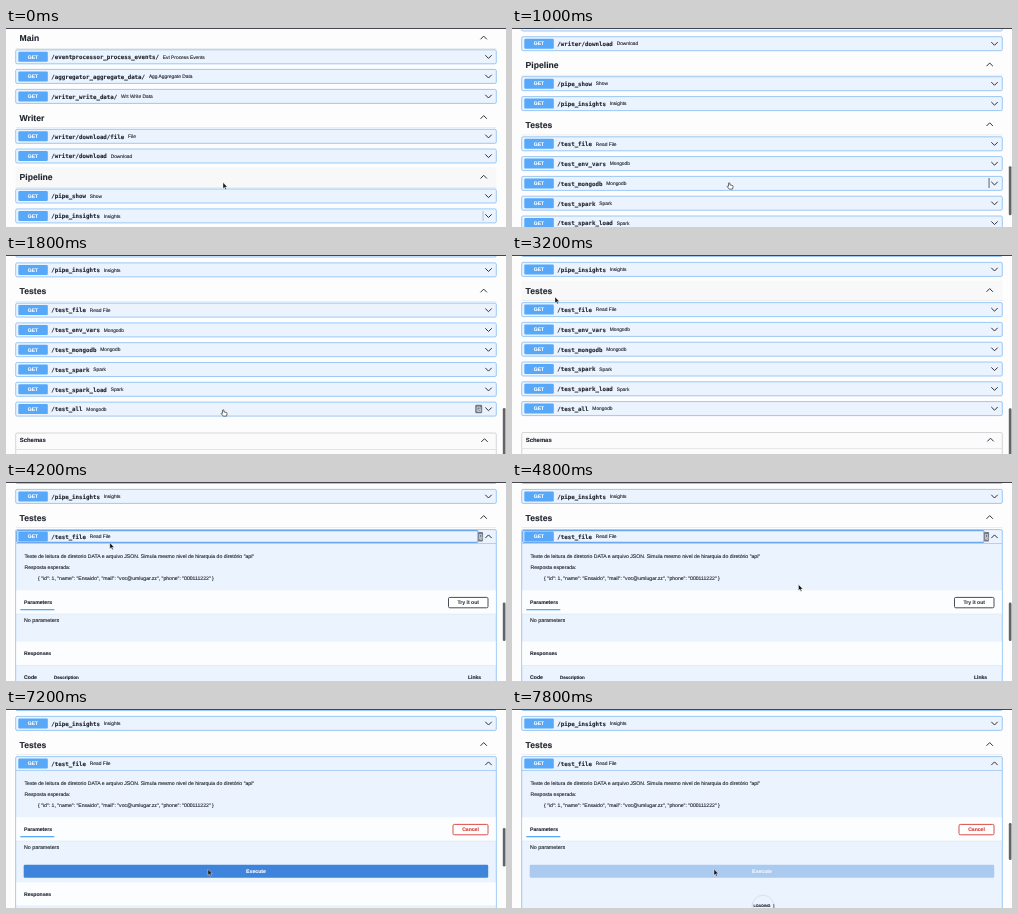
Write an HTML page that moves like this. It is 500 px wide and 199 px high and loops after 8 s.

```html
<!DOCTYPE html>
<html lang="pt">
<head>
<meta charset="utf-8">
<title>API docs</title>
<style>
  html, body { margin: 0; width: 100%; height: 100%; overflow: hidden; background: #fdfdfd; }
  svg { display: block; width: 500px; height: 199px; text-rendering: geometricPrecision; }
  text { font-family: "Liberation Sans", Arial, sans-serif; fill: #20242f; stroke: #20242f; stroke-width: 0.12; white-space: pre; }
  .b { font-weight: 700; }
  .m { font-family: "DejaVu Sans Mono", monospace; font-weight: 700; }
</style>
</head>
<body>
<svg id="stage" viewBox="0 0 500 199"></svg>
<script>
const LOOP = 8000, STEP = 200, MONO = 5.77;
const BLUE = '#58a8fa', EDGE = '#86bdf3', PALE = '#eaf3fe';
const stage = document.getElementById('stage');

function el(tag, attrs, parent, content) {
  const node = document.createElementNS(stage.namespaceURI, tag);
  for (const key in attrs) node.setAttribute(key, attrs[key]);
  if (content) node.textContent = content;
  return parent.appendChild(node);
}
const group = (parent, attrs = {}) => el('g', attrs, parent);
const rect = (p, x, y, width, height, fill, more) =>
  el('rect', { x, y, width, height, fill, ...more }, p);
// y is the vertical middle of the line
const label = (p, x, y, size, str, cls = '', more = {}) =>
  el('text', { x, y: y + size * 0.355, 'font-size': size, class: cls, ...more }, p, str);
const centred = (p, x, y, size, str, ink) =>
  label(p, x, y, size, str, 'b', { 'text-anchor': 'middle', style: `fill:${ink};stroke:${ink}` });
const show = (node, on) => node.setAttribute('display', on ? 'inline' : 'none');
const move = (node, x, y) => node.setAttribute('transform', `translate(${x} ${y})`);

function chevron(p, x, y, up) {
  const d = up ? 1.6 : -1.6;
  el('path', { d: `M${x - 3.2} ${y + d}L${x} ${y - d}L${x + 3.2} ${y + d}`,
    fill: 'none', stroke: '#2c303b', 'stroke-width': 1 }, p);
}

function rowHead(p, y, path, note, up) {
  rect(p, 12.3, y - 5, 29.5, 10, BLUE, { rx: 1.2 });
  centred(p, 27, y, 5.1, 'GET', '#fff');
  label(p, 45.3, y + 0.3, MONO, path, 'm');
  label(p, 49.1 + path.length * MONO * 0.602, y, 4.85, note);
  chevron(p, 482.5, y, up);
}

function row(p, y, path, note) {
  rect(p, 9.7, y - 7, 480.6, 14, PALE, { rx: 1.4, stroke: EDGE, 'stroke-width': 0.8 });
  rowHead(p, y, path, note);
}

function section(p, y, name) {
  label(p, 13.6, y, 8.6, name, 'b');
  chevron(p, 477.7, y - 0.3, true);
  rect(p, 9.5, y + 10, 481, 0.5, '#dcdde0');
}

const page = group(stage);
const band = rect(page, 9.5, 0, 481, 20, '#000', { opacity: 0.02 });
section(page, 10, 'Main');
row(page, 28.8, '/eventprocessor_process_events/', 'Evt Process Events');
row(page, 48.4, '/aggregator_aggregate_data/', 'Agg Aggregate Data');
row(page, 68.4, '/writer_write_data/', 'Wrt Write Data');
section(page, 89.5, 'Writer');
row(page, 108.3, '/writer/download/file', 'File');
row(page, 128, '/writer/download', 'Download');
section(page, 149.2, 'Pipeline');
row(page, 168, '/pipe_show', 'Show');
row(page, 187.9, '/pipe_insights', 'Insights');
section(page, 209, 'Testes');

const closed = group(page);
[['file', 'Read File'], ['env_vars', 'Mongodb'], ['mongodb', 'Mongodb'],
 ['spark', 'Spark'], ['spark_load', 'Spark'], ['all', 'Mongodb']]
  .forEach(([name, note], i) => row(closed, 228.1 + i * 19.8, '/test_' + name, note));
rect(closed, 9.7, 351, 480.6, 60, '#fbfbfb', { rx: 1.4, stroke: '#c4c6ca', 'stroke-width': 0.7 });
rect(closed, 10, 367, 480, 0.6, '#d3d4d8');
label(closed, 13.8, 358.3, 5.9, 'Schemas', 'b');
chevron(closed, 478.5, 358.3, true);

// Expanded operation, in screen coordinates
const panel = group(stage);
rect(panel, 9.7, 47.6, 480.6, 200, PALE, { rx: 1.4, stroke: EDGE, 'stroke-width': 0.8 });
rect(panel, 10, 61.3, 480, 0.6, EDGE);
rowHead(panel, 54.5, '/test_file', 'Read File', true);
const focus = rect(panel, 10.8, 48.7, 461.2, 11.6, 'none', { stroke: '#4f97ea', 'stroke-width': 1, rx: 0.8 });
label(panel, 18.5, 74.6, 5.13, 'Teste de leitura de diretorio DATA e arquivo JSON. Simula mesmo nivel de hirarquia do diretório "api"');
label(panel, 18.5, 85.6, 5.13, 'Resposta esperada:');
label(panel, 32, 96, 5.12, '{ "id": 1, "name": "Ensaido", "mail": "voc@umlugar.zz", "phone": "000111222" }');

function header(p, y) {
  rect(p, 10.2, y, 479.6, 23.6, '#fff', { opacity: 0.85 });
  rect(p, 10.2, y + 23.6, 479.6, 0.6, '#dfe5ec');
}
function button(p, x, y, w, h, str, ink) {
  rect(p, x, y, w, h, '#fff', { rx: 1.3, stroke: ink, 'stroke-width': 0.9 });
  centred(p, x + w / 2, y + h / 2, 5.1, str, ink);
}
header(panel, 108.2);
label(panel, 18, 120.2, 5.15, 'Parameters', 'b');
rect(panel, 14.3, 127, 34, 1.3, BLUE);
label(panel, 18, 137.8, 5.3, 'No parameters');
const tryOut = group(panel), cancel = group(panel);
button(tryOut, 442.5, 115.4, 39.5, 10.4, 'Try it out', '#363a44');
button(cancel, 447, 115.4, 35, 10.4, 'Cancel', '#d93a34');

const execute = group(panel);
rect(execute, 17.7, 155.8, 464.5, 13, '#3d84da', { rx: 1.3 });
centred(execute, 250, 162.2, 5.2, 'Execute', '#fff');

const responses = group(panel);
header(responses, 159.6);
label(responses, 18, 171.1, 5.1, 'Responses', 'b');
label(responses, 18, 195.1, 5.2, 'Code', 'b');
label(responses, 48, 195.1, 4.5, 'Description', 'b');
label(responses, 462, 195.1, 5, 'Links', 'b');

const loading = group(panel);
el('circle', { cx: 251, cy: 197.3, r: 11, fill: 'none', stroke: '#d0d7e0', 'stroke-width': 0.7 }, loading);
const arc = el('path', { d: 'M10.8 -2.2A11 11 0 0 1 2.2 10.8', fill: 'none',
  stroke: '#4d535d', 'stroke-width': 0.8 }, loading);
label(loading, 250, 196.4, 3.7, 'LOADING', 'b', { 'text-anchor': 'middle' });

const bar = rect(stage, 476.6, 150, 0.9, 10, '#4b5160');
const copy = group(stage);
rect(copy, -3.5, -4.3, 7, 8.6, '#737a87', { rx: 1.2 });
el('path', { d: 'M-1.6 -2H1.4V0M-1.6 -2V2.2H0M0 0.4H2V2.4H0Z', fill: 'none', stroke: '#fff', 'stroke-width': 0.6 }, copy);

rect(stage, 0, 0, 500, 0.9, '#30323d');
const thumb = rect(stage, 496.8, 0, 2.7, 40, '#62646a', { rx: 1.2 });

const arrow = el('path', { d: 'M0 0V6L1.4 4.8L2.4 7L3.4 6.6L2.4 4.4H4.3Z',
  fill: '#111', stroke: '#fff', 'stroke-width': 0.4 }, stage);
const hand = el('path', { d: 'M-0.5 3.6V0.6Q0.2 -0.2 0.9 0.6V2.4L3.6 3Q4.2 3.2 4 4.4L3.5 6.6H0.2L-1.8 4.2Q-1.8 3.2 -0.5 3.8Z',
  fill: '#fff', stroke: '#222', 'stroke-width': 0.65 }, stage);

const scrollKeys = [[0, 0], [999, 0], [1000, 112.3], [1200, 153], [1400, 169], [1600, 173], [2800, 173], [3000, 173.5]];
const pointerKeys = [[0, 217, 154.5], [2000, 217, 154.5], [3200, 43, 42], [3600, 70, 53], [4000, 70, 53],
  [4800, 286.5, 102.5], [5600, 456.8, 120.3], [6400, 456.8, 120.3], [7200, 202, 160.3]];

function at(keys, t) {
  const i = keys.findIndex(k => k[0] > t);
  if (i < 0) return keys[keys.length - 1].slice(1);
  const a = keys[i - 1], b = keys[i];
  const u = (t - a[0]) / (b[0] - a[0]), s = u * u * (3 - 2 * u);
  return a.slice(1).map((v, j) => v + (b[j + 1] - v) * s);
}

function draw(t) {
  const open = t >= 4000, editing = t >= 5800, busy = t >= 7600;
  const [scroll] = at(scrollKeys, t), [x, y] = at(pointerKeys, t);
  move(page, 0, -scroll);
  band.setAttribute('y', t < 1000 ? 139.2 : 199);
  show(band, t < 1000 || (t >= 3000 && t < 3400));
  show(closed, !open);
  show(panel, open);
  show(focus, open && !editing);
  show(tryOut, !editing);
  show(cancel, editing);
  show(execute, editing);
  execute.setAttribute('opacity', busy ? 0.36 : 1);
  show(responses, !busy);
  move(responses, 0, editing ? 13.6 : 0);
  show(loading, busy);
  arc.setAttribute('transform', `translate(251 197.3) rotate(${(t - 7800) * 0.36})`);

  show(bar, t < 1200);
  bar.setAttribute('y', t < 1000 ? 183 : 150);
  bar.setAttribute('opacity', t < 1000 ? 0.35 : 1);
  show(copy, (t >= 1200 && t < 2400) || (open && !editing));
  copy.setAttribute('transform', open ? 'translate(474.6 54.7) scale(.7 1.1)' : 'translate(472.7 154)');

  show(thumb, t >= 1000);
  thumb.setAttribute('y', busy ? 114 : editing ? 119 : open ? 120.5 : 110.5 + scroll * 0.246);
  thumb.setAttribute('height', busy ? 37 : open ? 38.5 : 49);

  const link = (t >= 1000 && t < 2800) || (t >= 3400 && t < 4200);
  show(hand, link);
  show(arrow, !link);
  move(link ? hand : arrow, x, y);
}

function tick(now) {
  draw(Math.floor(now % LOOP / STEP) * STEP);
  requestAnimationFrame(tick);
}
draw(0);
requestAnimationFrame(tick);
</script>
</body>
</html>
```
